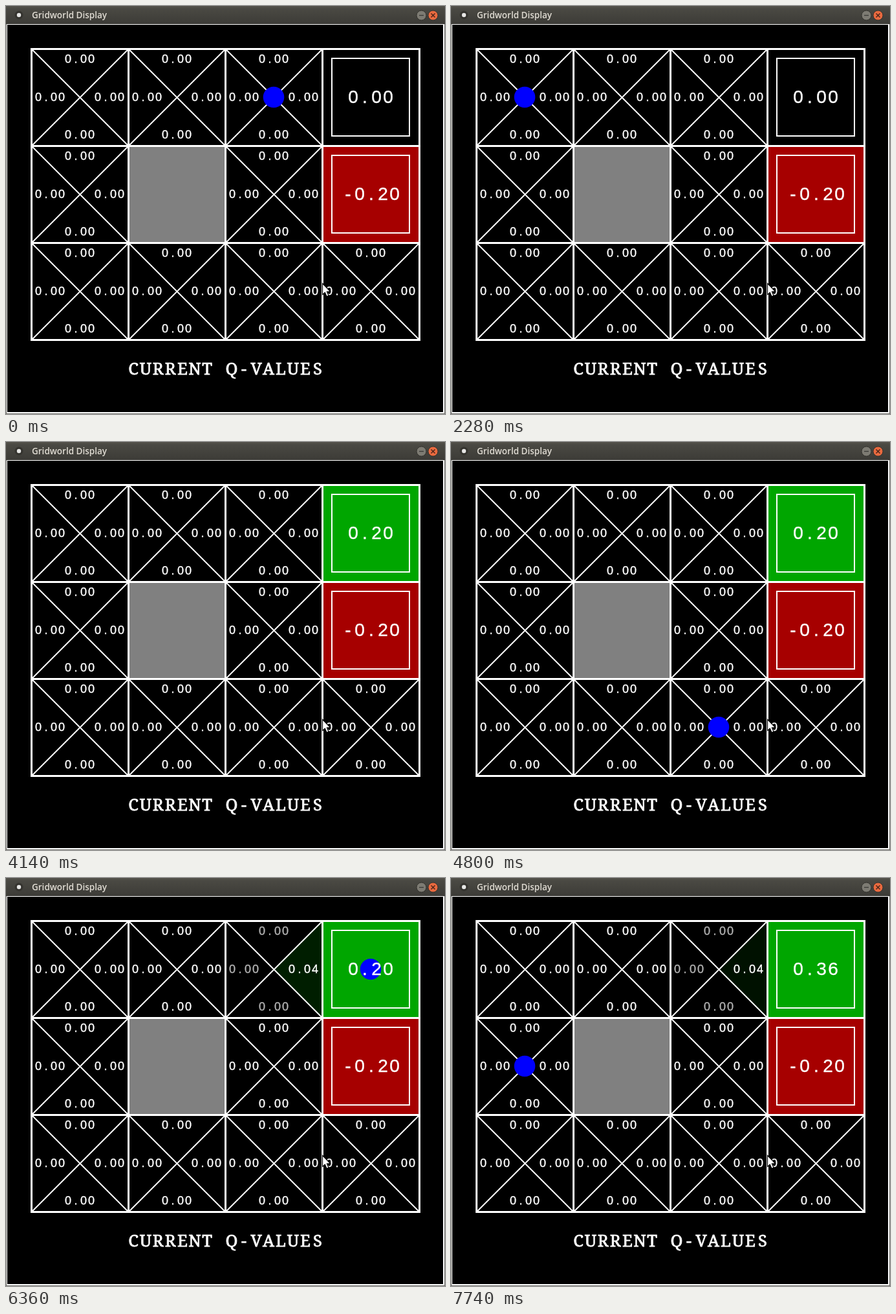
These frames come from a looping animation (679 by 631 pixels, 8000 ms). An HTML page with a canvas:

```html
<!DOCTYPE html>
<html lang="en">
<head>
<meta charset="utf-8">
<title>Gridworld Display</title>
<style>
  html, body { margin: 0; width: 100%; height: 100%; overflow: hidden; background: #000; }
  canvas { display: block; }
</style>
</head>
<body>
<canvas id="stage" width="679" height="631"></canvas>
<script>
const ctx = document.getElementById('stage').getContext('2d');
const LOOP = 8000, TICK = 60, CELL = 150, LEFT = 39.5, TOP = 66.5;

// Start time and one action per tick: moves, '.' wait, X exit, S restart.
const RUNS = [
  [60, 'LLDD.UURL'], [900, 'DD.U'], [1320, 'U'], [1560, 'R'], [2040, 'RL'],
  [2280, 'LD.D'], [2760, 'R'], [2940, 'RR'], [3240, 'LUU'],
  [3480, 'LLDD.RRU.URXSUUR.LDD.RRUUL'], [5340, 'L'], [5580, 'R'],
  [6000, 'RDDU.UR.XSU.UD'], [7140, 'U'], [7380, 'R.L'], [7740, 'D']
];
const MOVES = { L: [-1, 0], R: [1, 0], U: [0, -1], D: [0, 1] };

function stateAt(time) {
  const s = { col: 2, row: 0, gone: false, goal: 0, east: 0 };
  for (const [start, actions] of RUNS) {
    for (let i = 0; i < actions.length && start + i * TICK <= time; i++) {
      const act = actions[i], move = MOVES[act];
      if (move) {
        s.col += move[0];
        s.row += move[1];
        if (s.col === 3 && s.row === 0) s.east += 0.2 * (0.9 * s.goal - s.east);
      } else if (act === 'X') {
        s.gone = true;
        s.goal += 0.2 * (1 - s.goal);
      } else if (act === 'S') {
        Object.assign(s, { col: 0, row: 2, gone: false });
      }
    }
  }
  return s;
}

function poly(points, fill, stroke, width = 2) {
  ctx.beginPath();
  points.forEach(([x, y]) => ctx.lineTo(x, y));
  ctx.closePath();
  if (fill) { ctx.fillStyle = fill; ctx.fill(); }
  if (stroke) { ctx.strokeStyle = stroke; ctx.lineWidth = width; ctx.stroke(); }
}

function line(x1, y1, x2, y2, width, color = '#fff') {
  ctx.strokeStyle = color;
  ctx.lineWidth = width;
  ctx.beginPath();
  ctx.moveTo(x1, y1);
  ctx.lineTo(x2, y2);
  ctx.stroke();
}

function disc(x, y, r, fill, stroke) {
  ctx.beginPath();
  ctx.arc(x, y, r, 0, Math.PI * 2);
  ctx.fillStyle = fill;
  ctx.fill();
  if (stroke) { ctx.strokeStyle = stroke; ctx.lineWidth = 1; ctx.stroke(); }
}

// Centred text with every character on a fixed pitch.
function mono(text, x, base, pitch, font, color = '#fff', weight = 0.4) {
  ctx.font = font;
  ctx.textAlign = 'center';
  ctx.fillStyle = ctx.strokeStyle = color;
  ctx.lineWidth = weight;
  [...text].forEach((ch, i) => {
    const cx = x + (i - (text.length - 1) / 2) * pitch;
    ctx.fillText(ch, cx, base);
    ctx.strokeText(ch, cx, base);
  });
}

const small = (value, x, y, color) =>
  mono(value.toFixed(2), x, y + 6, 12, '18px "Liberation Sans", sans-serif', color);
const large = (value, x, y) =>
  mono(value.toFixed(2), x, y + 9, 18, '28px "Liberation Sans", sans-serif');

const shade = (value, max) =>
  `rgb(0,${max > 0 ? Math.round(166 * value / max) : 0},0)`;

const center = (col, row) => [LEFT + CELL * (col + 0.5), TOP + CELL * (row + 0.5)];

function cellBase(col, row, fill) {
  const [x, y] = center(col, row);
  ctx.fillStyle = fill;
  ctx.fillRect(x - 75, y - 75, CELL, CELL);
}

function terminalBase(col, row, fill) {
  cellBase(col, row, fill);
  const [x, y] = center(col, row);
  ctx.strokeStyle = '#fff';
  ctx.lineWidth = 2;
  ctx.strokeRect(x - 60.5, y - 60.5, 120, 120);
}

function qBase(col, row, east, max) {
  const [x, y] = center(col, row);
  if (east > 0) poly([[x, y], [x + 75, y - 75], [x + 75, y + 75]], shade(east, max));
  line(x - 75, y - 75, x + 75, y + 75, 2);
  line(x - 75, y + 75, x + 75, y - 75, 2);
}

function qText(col, row, east) {
  const [x, y] = center(col, row);
  const rest = east > 0 ? '#b2b2b2' : '#fff';
  small(0, x - 0.5, y - 59.5, rest);
  small(0, x - 0.5, y + 57.5, rest);
  small(0, x - 46.5, y - 0.5, rest);
  small(east, x + 45.5, y - 0.5, '#fff');
}

function windowFrame() {
  ctx.fillStyle = '#6b6a65';
  ctx.fillRect(0, 0, 679, 631);
  ctx.fillStyle = '#fff';
  ctx.fillRect(1, 28, 677, 602);
  ctx.fillStyle = '#000';
  ctx.fillRect(2, 29, 674, 599);

  const bar = ctx.createLinearGradient(0, 0, 0, 28);
  bar.addColorStop(0, '#55534c');
  bar.addColorStop(0.15, '#4a4943');
  bar.addColorStop(1, '#3c3b37');
  ctx.fillStyle = bar;
  ctx.fillRect(0, 0, 679, 28);

  disc(20, 14, 6.5, '#35342f');
  disc(20, 14, 3.2, '#e6e6e4');
  ctx.font = '600 13.5px "Open Sans", sans-serif';
  ctx.textAlign = 'left';
  ctx.fillStyle = '#dfdbd2';
  ctx.fillText('Gridworld Display', 40, 19);

  disc(642.5, 14.5, 7.5, '#7d7b73', '#33322e');
  line(639, 14.5, 646, 14.5, 1.3, '#3a3935');
  disc(660.5, 14.5, 7.5, '#ea6a3f', '#33322e');
  line(657.5, 11.5, 663.5, 17.5, 1.4, '#47251a');
  line(657.5, 17.5, 663.5, 11.5, 1.4, '#47251a');
}

function pointer() {
  poly([[489.5, 429], [489.5, 446.5], [493.3, 443], [496, 449.2], [499, 448],
        [496.4, 441.8], [501.5, 441.5]], '#fff', '#000', 1.2);
}

function draw(time) {
  const s = stateAt(time);
  const max = Math.max(s.goal, s.east);
  const cells = [];
  for (let row = 0; row < 3; row++)
    for (let col = 0; col < 4; col++)
      if (!(row === 1 && col === 1) && !(col === 3 && row < 2))
        cells.push([col, row, col === 2 && row === 0 ? s.east : 0]);

  windowFrame();
  cellBase(1, 1, '#808080');
  terminalBase(3, 0, shade(s.goal, max));
  terminalBase(3, 1, '#a60000');
  cells.forEach(([col, row, east]) => qBase(col, row, east, max));

  for (let i = 0; i < 5; i++)
    line(LEFT + i * CELL, TOP - 1.5, LEFT + i * CELL, TOP + 3 * CELL + 1.5, 3);
  for (let i = 0; i < 4; i++)
    line(LEFT - 1.5, TOP + i * CELL, LEFT + 4 * CELL + 1.5, TOP + i * CELL, 3);

  if (!s.gone) {
    const [x, y] = center(s.col, s.row);
    disc(x - 0.5, y - 0.5, 16.3, '#00f');
  }

  cells.forEach(([col, row, east]) => qText(col, row, east));
  large(s.goal, 564, 141);
  large(-0.2, 565, 291);
  mono('CURRENT Q-VALUES', 339.5, 570, 19, '25.5px "Noto Serif", serif', '#fff', 0.8);
  pointer();
}

const begin = performance.now();
function frame() {
  draw((performance.now() - begin) % LOOP);
  requestAnimationFrame(frame);
}
frame();
</script>
</body>
</html>
```
